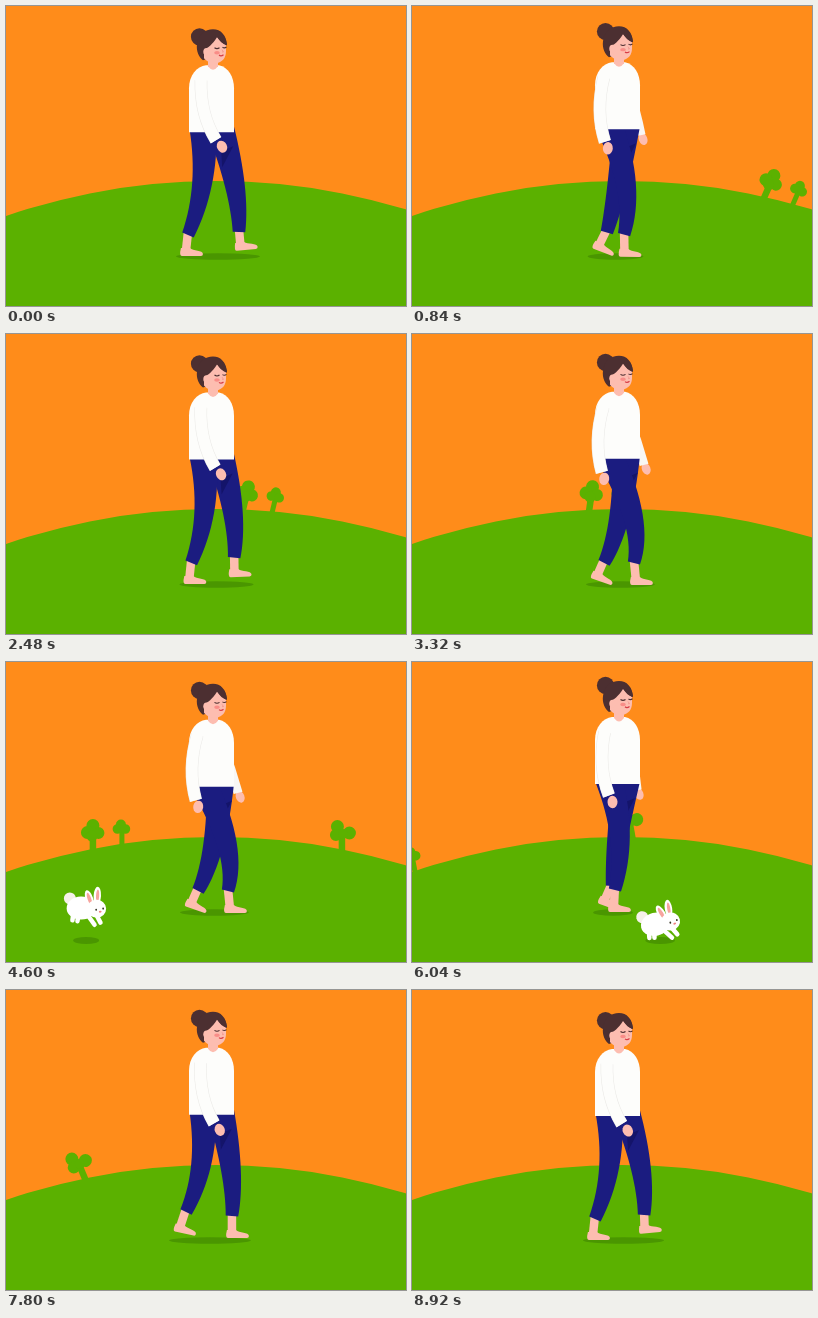
An HTML page with a canvas that plays this animation: 400x300 px, repeating every 8960 ms.

```html
<!DOCTYPE html>
<html lang="en">
<head>
<meta charset="utf-8">
<title>Evening walk</title>
<style>
html, body { margin: 0; width: 100%; height: 100%; overflow: hidden; background: #ff8c1a; }
canvas { display: block; width: 400px; height: 300px; }
</style>
</head>
<body>
<canvas id="stage" width="400" height="300"></canvas>
<script>
const g = document.getElementById('stage').getContext('2d');
const LOOP = 8960, STEP = 1280, TAU = Math.PI * 2;
const HILL = { x: 210, y: 822, r: 647 };
const SKY = '#ff8c1a', GRASS = '#5bb100', SHADE = '#4a9600', SKIN = '#fdbdb0',
  HAIR = '#4c2f31', CLOTH = '#fdfdfb', NAVY = '#1b1c80', DARK = '#14146a';

// Leg poses over one stride: time, knee x y, hem x y, heel x y, foot angle
const NEAR = [
  [0, 196, 178, 182, 229, 174, 250, 0],
  [120, 195, 175, 180, 222, 167, 241, .22],
  [400, 201, 178, 192, 219, 177, 236, .45],
  [540, 216, 176, 212, 222, 205, 244, .15],
  [640, 227, 179, 230, 226, 227, 246, -.1],
  [760, 221, 182, 222, 229, 218, 251, 0],
  [920, 208, 175, 203, 228, 196, 250, 0],
  [1240, 197, 178, 183, 229, 175, 250, 0]
];
const FAR = [
  [0, 229, 180, 233, 226, 229, 245, -.1],
  [120, 225, 180, 226, 226, 220, 248, 0],
  [400, 214, 178, 208, 229, 201, 251, 0],
  [640, 208, 182, 197, 230, 186, 250, .06],
  [760, 207, 184, 192, 229, 178, 244, .33],
  [920, 205, 178, 200, 224, 185, 241, .35],
  [1100, 220, 177, 217, 221, 210, 242, .12],
  [1240, 229, 179, 232, 225, 227, 244, -.1]
];
// Trees as trunk x, base y, trunk top, trunk width, then leaf circles
const TREES = [
  [87, 196, 168, 6.5, [[87, 163.5, 6.5], [81.5, 170.5, 6.5], [92.5, 171, 6], [86, 174, 5.5]]],
  [116, 190, 165, 5, [[115, 162.5, 5], [111.5, 167, 4.8], [119.5, 167, 4.8]]],
  [336, 198, 168, 6.5, [[331.5, 164.5, 6.5], [343.5, 171, 6.5], [330, 173, 6], [337, 172, 5]]]
];

function pose(keys, t) {
  const n = keys.length;
  const at = i => {
    const k = keys[(i + n) % n];
    return [k[0] + Math.floor(i / n) * STEP, ...k.slice(1)];
  };
  let i = n - 1;
  while (keys[i][0] > t) i--;
  const [a, b, c, d] = [at(i - 1), at(i), at(i + 1), at(i + 2)];
  const span = c[0] - b[0], u = (t - b[0]) / span, v = 1 - u;
  return b.slice(1).map((p, j) => {
    j++;
    const m0 = (c[j] - a[j]) / (c[0] - a[0]) * span;
    const m1 = (d[j] - b[j]) / (d[0] - b[0]) * span;
    return p * (1 + 2 * u) * v * v + m0 * u * v * v + c[j] * u * u * (3 - 2 * u) - m1 * u * u * v;
  });
}

function oval(x, y, rx, ry, color, turn = 0) {
  g.fillStyle = color;
  g.beginPath();
  g.ellipse(x, y, rx, ry, turn, 0, TAU);
  g.fill();
}

function shape(d, color) {
  g.fillStyle = color;
  g.fill(new Path2D(d));
}

function line(d, color, width) {
  g.strokeStyle = color;
  g.lineWidth = width;
  g.stroke(new Path2D(d));
}

function placed(x, y, turn, draw) {
  g.save();
  g.translate(x, y);
  g.rotate(turn);
  draw();
  g.restore();
}

function trees(t) {
  const turn = (4600 - t) * (t < 4600 ? .0063 : .00716) * Math.PI / 180;
  placed(HILL.x, HILL.y, turn, () => {
    g.translate(-HILL.x, -HILL.y);
    for (const [x, base, top, w, leaves] of TREES) {
      g.fillStyle = GRASS;
      g.fillRect(x - w / 2, top, w, base - top);
      for (const [cx, cy, r] of leaves) oval(cx, cy, r, r, GRASS);
    }
  });
}

function leg(hipX, hipY, [kx, ky, hx, hy, fx, fy, turn]) {
  const c = Math.cos(turn), s = Math.sin(turn);
  line(`M${hx} ${hy - 3}L${fx + 6 * c + 5 * s} ${fy + 6 * s - 5 * c}`, SKIN, 8.5);
  placed(fx, fy, turn, () =>
    shape('M1-8L10-8C13-5 23-6 23-2Q23 0 21 0H2Q-1 0 1-8Z', SKIN));
  // Tapered trouser leg along a curve through the knee
  const cx = 2 * kx - (hipX + hx) / 2, cy = 2 * ky - (hipY + hy) / 2;
  const left = [], right = [];
  for (let i = 0; i <= 16; i++) {
    const u = i / 16, v = 1 - u;
    const x = v * v * hipX + 2 * u * v * cx + u * u * hx;
    const y = v * v * hipY + 2 * u * v * cy + u * u * hy;
    const dx = v * (cx - hipX) + u * (hx - cx), dy = v * (cy - hipY) + u * (hy - cy);
    const half = (27 - 14.5 * u) / 2 / Math.hypot(dx, dy);
    left.push([x - dy * half, y + dx * half]);
    right.unshift([x + dy * half, y - dx * half]);
  }
  shape('M' + [...left, ...right].join('L') + 'Z', NAVY);
}

function head(bob) {
  oval(193.5, 27 + bob * .75, 8.6, 8.6, HAIR);
  shape('M191 36C192 26 199 21 207 21C215 21 220 27 221 36L214 46L197 52C193 49 190 43 191 36Z', HAIR);
  shape('M211 29C206 37 202 39 198 42L198 50Q203 56 210 55C217 54 220 49 220 43L220 37Q215 34 211 29Z', SKIN);
  oval(200.5, 43.5, 3.2, 3.8, SKIN);
  shape('M211 28Q214 35 221 37Q220 26 211 22Z', HAIR);
  oval(211, 44.5, 2.8, 1.7, '#f98d88');
  line('M208.5 39.5Q211 41.3 213.5 39.5M216.5 39Q218.5 40.5 220.5 38.8', HAIR, 1.1);
  line('M216 41.5L217.5 43.8H216', '#ee8e87', .7);
  line('M213 46.8Q215 48.5 217.5 46.5', '#d83c45', 1.2);
}

function woman(t) {
  const swing = Math.cos(TAU * t / STEP), bob = 2.2 * Math.cos(2 * TAU * t / STEP);
  const near = pose(NEAR, t % STEP), far = pose(FAR, t % STEP);
  const x0 = Math.min(near[4], far[4]) - 4, x1 = Math.max(near[4], far[4]) + 25;
  oval((x0 + x1) / 2, 250.5, (x1 - x0) / 2, 3.2, SHADE);

  g.lineCap = 'butt';
  const fx = 225 - 11 * swing, fy = 134 + bob;
  oval(fx, fy, 4.3, 6, SKIN, -.35);
  line(`M216 ${82 + bob}Q${222 - 4 * swing} ${105 + bob} ${fx - 2} ${fy - 4}`, '#f8f7f5', 9);

  leg(214.5, 120 + bob, far);
  shape(`M${213 + bob} ${143 + bob}L${225 + bob} ${138 + bob}L${214 + bob} ${159 + bob}Z`, DARK);
  leg(197, 120 + bob, near);

  g.save();
  g.translate(0, bob);
  shape('M183 124V80C183 67 191 58 200 57H213C222 59 228 68 228 80V124Z', CLOTH);
  shape('M202 48H212V58Q207 65 202 58Z', SKIN);
  head(bob);

  const wx = 199 + 11 * swing, wy = 135 - 3 * swing;
  const arm = `M${193 + 2 * swing} 72Q${187 + 7 * swing} 106 ${wx} ${wy}`;
  oval(wx + 4 + 2 * swing, wy + 6.5, 5, 6.2, SKIN, -.35 * swing - .1);
  line(arm, '#e9e8e5', 12.6);
  line(arm, CLOTH, 11.6);
  oval(193 + 2 * swing, 71, 5.8, 5.8, CLOTH);
  g.restore();
}

function rabbit(t) {
  const x = 79 + (t - 4600) * .1167;
  if (x < -40 || x > 440) return;
  const hop = TAU * ((t - 4400) / 400);
  const lift = (1 - Math.cos(hop)) / 2;
  oval(x + 1, 278.5, 15 - 2 * lift, 3.4, SHADE);
  placed(x, 263 - 17 * lift, -.12 - .12 * Math.sin(hop + .9), () => {
    g.lineCap = 'round';
    oval(-15, -10, 6, 6, '#f6f1e9');
    line('M-12 6L-13 12M-7 8L-8 13M3 8L9 17M12 9L15 15', '#fff', 4.5);
    oval(-4, 0, 14.5, 11.5, '#fff');
    oval(4.5, -9, 3.8, 9, '#fff', -.3);
    oval(4.5, -9, 1.8, 6.5, '#f7a49e', -.3);
    oval(12.5, -12, 3.7, 9, '#fff', .08);
    oval(12.8, -12, 1.6, 6.2, '#f7a49e', .08);
    oval(11.5, 1, 9.5, 9, '#fff');
    oval(11, 2, .9, 1.1, '#332');
    oval(18, 1, .9, 1.1, '#332');
    oval(15, 4, 1.4, 1, '#f08080');
  });
}

function frame(now) {
  const t = now % LOOP;
  g.fillStyle = SKY;
  g.fillRect(0, 0, 400, 300);
  trees(t);
  oval(HILL.x, HILL.y, HILL.r, HILL.r, GRASS);
  woman(t);
  rabbit(t);
  requestAnimationFrame(() => frame(performance.now() - start));
}
const start = performance.now();
frame(0);
</script>
</body>
</html>
```
